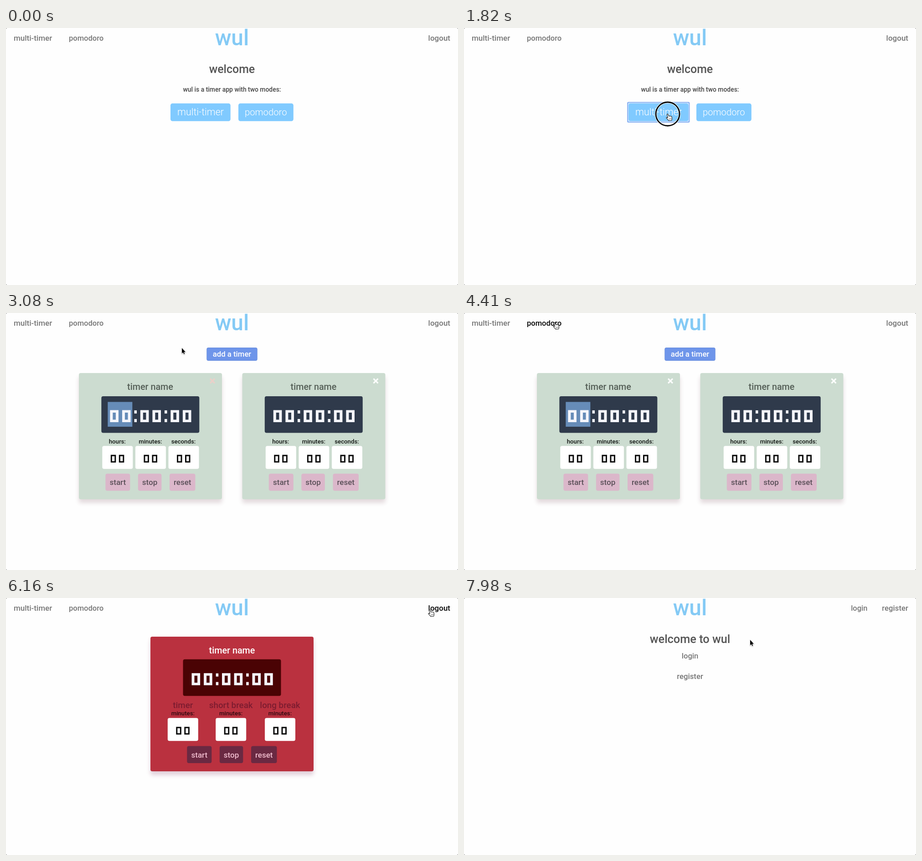
An HTML page with a canvas that plays this animation: 992x565 px, repeating every 8 s.

```html
<!DOCTYPE html>
<html lang="en">
<head>
<meta charset="utf-8">
<title>timer app</title>
<style>
html, body { margin: 0; width: 100%; height: 100%; overflow: hidden; background: #fefefe; }
canvas { display: block; width: 992px; height: 565px; }
</style>
</head>
<body>
<canvas id="stage" width="992" height="565"></canvas>
<script>
const W = 992, H = 565, LOOP = 8000, STEP = 70;
const APP = 'wul';
const ctx = document.getElementById('stage').getContext('2d');

// Pointer track: time, x, y
const TRACK = [
  [0, 566, 590], [420, 500, 330], [840, 446, 188], [980, 447, 189],
  [2380, 447, 189], [2870, 453, 152], [3080, 386, 77], [3640, 240, 36],
  [4060, 199, 21], [4900, 199, 21], [5250, 470, 52], [5390, 470, 52],
  [6090, 930, 26], [7420, 930, 26], [7770, 628, 92], [8000, 628, 92]
];
const CLICKS = [[1820, 1890], [1960, 2100], [4270, 4410], [6300, 6440]];
const PAGES = [[6510, 'guest'], [4480, 'pomodoro'], [1890, 'multi'], [0, 'home']];

function clamp(v) { return v < 0 ? 0 : v > 1 ? 1 : v; }

function pointerAt(t) {
  let i = 0;
  while (i < TRACK.length - 2 && t >= TRACK[i + 1][0]) i++;
  const [t0, x0, y0] = TRACK[i], [t1, x1, y1] = TRACK[i + 1];
  const k = clamp((t - t0) / (t1 - t0)), e = k * k * (3 - 2 * k);
  return { x: x0 + (x1 - x0) * e, y: y0 + (y1 - y0) * e };
}

function within(p, x0, y0, x1, y1) {
  return p.x >= x0 && p.x < x1 && p.y >= y0 && p.y < y1;
}

function text(str, x, y, size, color, weight = 500, align = 'center') {
  ctx.font = `${weight} ${size}px Roboto, "Open Sans", sans-serif`;
  ctx.textAlign = align;
  ctx.fillStyle = color;
  ctx.fillText(str, x, y);
}

function box(x, y, w, h, color, r = 4) {
  ctx.fillStyle = color;
  ctx.beginPath();
  ctx.roundRect(x, y, w, h, r);
  ctx.fill();
}

function card(x, y, w, h, color, shadow) {
  ctx.save();
  ctx.shadowColor = shadow;
  ctx.shadowBlur = 10;
  ctx.shadowOffsetY = 8;
  box(x, y, w, h, color);
  ctx.restore();
}

function zero(x, y, w, h, side, cap) {
  ctx.beginPath();
  ctx.rect(x, y, w, h);
  ctx.rect(x + side, y + cap, w - 2 * side, h - 2 * cap);
  ctx.fill('evenodd');
}

function clock(x, y, back, selected) {
  box(x, y, 215, 80.5, back);
  if (selected) box(x + 14, y + 12.5, 54, 54.5, '#668cb8', 0);
  ctx.fillStyle = '#f5f6fc';
  let gx = x + 19;
  for (const ch of '00:00:00') {
    if (ch === '0') {
      zero(gx, y + 30.5, 18.6, 26.5, 6, 5.5);
      gx += 26.6;
    } else {
      ctx.fillRect(gx, y + 31, 5.5, 7);
      ctx.fillRect(gx, y + 50, 5.5, 7);
      gx += 13.3;
    }
  }
}

function field(x, y) {
  box(x, y, 67, 50.5, '#fff');
  ctx.fillStyle = '#0a0a0a';
  zero(x + 18.5, y + 19.5, 11.5, 17, 3, 3);
  zero(x + 36.5, y + 19.5, 11.5, 17, 3, 3);
}

function controls(x, y, back, ink) {
  const items = [['start', 0, 54], ['stop', 71.5, 51.5], ['reset', 140.7, 56.5]];
  for (const [label, dx, w] of items) {
    box(x + dx, y, w, 37.5, back);
    text(label, x + dx + w / 2, y + 25, 17, ink);
  }
}

function cross(x, y, color) {
  ctx.strokeStyle = color;
  ctx.lineWidth = 3.2;
  ctx.lineCap = 'butt';
  ctx.beginPath();
  ctx.moveTo(x - 5, y - 5);
  ctx.lineTo(x + 5, y + 5);
  ctx.moveTo(x + 5, y - 5);
  ctx.lineTo(x - 5, y + 5);
  ctx.stroke();
}

function timerCard(x, selected, crossColor) {
  card(x, 132, 314, 277.5, '#ccdcd0', 'rgba(90,30,50,.16)');
  cross(x + 293, 149.3, crossColor);
  text('timer name', x + 156.5, 168.5, 19.75, '#566058');
  clock(x + 49.3, 183, '#2f3a4b', selected);
  ['hours:', 'minutes:', 'seconds:'].forEach((label, i) => {
    const fx = x + 51.3 + 72.6 * i;
    text(label, fx + 33, 286.5, 13.2, '#101411');
    field(fx, 292.3);
  });
  controls(x + 58.3, 353.3, '#dbb7ca', '#5b5059');
}

const NAV = {
  user: [
    ['multi-timer', 17, 'left', 17, 0, 119],
    ['pomodoro', 138, 'left', 16.5, 120, 232],
    ['logout', 975, 'right', 17, 909, 992]
  ],
  guest: [
    ['login', 885.5, 'right', 16.5, 834, 902],
    ['register', 975, 'right', 16.8, 902, 992]
  ]
};

// Draws the top bar; returns true when the pointer is over a link
function navBar(items, p) {
  let over = false;
  for (const [label, x, align, size, x0, x1] of items) {
    const hot = within(p, x0, 5, x1, 40);
    over = over || hot;
    text(label, x, 28, size, hot ? '#080808' : '#777', 500, align);
  }
  text(APP, 496, 38, 48, '#84caf5');
  return over;
}

const pages = {
  home(t, p) {
    text('welcome', 496, 99, 24.9, '#555');
    text(APP + ' is a timer app with two modes:', 496, 140, 13.9, '#444');
    if (t >= 1820) {
      box(358, 162.5, 137.5, 45.5, '#8db4f2', 3);
      box(360, 164.5, 133.5, 41.5, '#d3e5fd', 3);
    }
    box(361, 165.7, 131.7, 39, '#80caff', 4.5);
    box(510, 165.7, 120.8, 39, '#80caff', 4.5);
    text('multi-timer', 427, 192, 21.3, '#fff', 300);
    text('pomodoro', 570.3, 192, 20.3, '#fff', 300);
    return within(p, 361, 166, 492, 204) || within(p, 510, 166, 630, 204);
  },
  multi(t, p) {
    box(440.3, 76, 111.4, 29, '#6388d6');
    box(441, 76.7, 110, 27.6, '#6e95ea', 3.5);
    text('add a timer', 496, 96.3, 16.7, '#fff');
    const pink = clamp((t - 2700) / 150) * clamp((3220 - t) / 220);
    const mix = (a, b) => Math.round(a + (b - a) * pink);
    const hot = `rgb(${mix(252, 226)},${mix(253, 182)},${mix(252, 172)})`;
    timerCard(160, t >= 1960, hot);
    timerCard(518.5, false, '#fcfdfc');
    return within(p, 443, 139, 463, 159);
  },
  pomodoro() {
    card(317, 85, 358, 296, '#ba313f', 'rgba(110,20,70,.2)');
    text('timer name', 496, 121.5, 19.75, '#fff');
    clock(388.5, 134.7, '#4a0304', false);
    const parts = [['timer', 388.3], ['short break', 493.7], ['long break', 601.5]];
    for (const [label, x] of parts) {
      text(label, x, 241.5, 18.8, '#7d1c30');
      text('minutes:', x, 258, 13.2, '#2c0a10');
      field(x - 33.5, 263.7);
    }
    controls(397.3, 325.5, '#6a2942', '#f0bccd');
    return false;
  },
  guest() {
    text('welcome to ' + APP, 496, 99, 25.3, '#555');
    text('login', 496, 133, 16.6, '#777');
    text('register', 496, 178, 16.8, '#777');
    return false;
  }
};

const ARROW = new Path2D('M0 0V12L2.7 9.5L4.5 13.5L6.2 12.8L4.5 8.8H8Z');
const HAND = new Path2D('M-1.6 1.2Q-1.2 -.6 .6 .2L2.6 5Q3.6 3.9 4.6 4.9Q5.8 4 6.7 5' +
  'Q8.2 4.4 8.9 6L9.5 9.5Q9.6 11.6 8.6 14.2L2.2 14.8Q.6 12.2 -2.6 9.4' +
  'Q-3.6 7.8 -1.8 7.4L.4 8.6Z');
const FINGERS = new Path2D('M3 9.6L3.5 12.6M5 9.3L5.4 12.4M7 9L7.3 12');

function pointer(p, hand) {
  ctx.save();
  ctx.translate(p.x, p.y);
  ctx.lineJoin = 'round';
  if (hand) {
    ctx.fillStyle = '#fff';
    ctx.fill(HAND);
    ctx.strokeStyle = '#1a1a1a';
    ctx.lineWidth = 1.1;
    ctx.stroke(HAND);
    ctx.lineWidth = 0.6;
    ctx.stroke(FINGERS);
  } else {
    ctx.shadowColor = 'rgba(0,0,0,.3)';
    ctx.shadowBlur = 2;
    ctx.shadowOffsetY = 1;
    ctx.strokeStyle = '#fff';
    ctx.lineWidth = 1.6;
    ctx.stroke(ARROW);
    ctx.shadowColor = 'transparent';
    ctx.fillStyle = '#050505';
    ctx.fill(ARROW);
  }
  ctx.restore();
}

function clickRing(p) {
  ctx.beginPath();
  ctx.arc(p.x, p.y, 26, 0, Math.PI * 2);
  ctx.strokeStyle = 'rgba(255,255,255,.8)';
  ctx.lineWidth = 5;
  ctx.stroke();
  ctx.strokeStyle = '#060606';
  ctx.lineWidth = 2.8;
  ctx.stroke();
}

function draw(t) {
  ctx.fillStyle = '#777';
  ctx.fillRect(0, 0, W, H);
  box(0, 0, W, H, '#fefefe', 3);
  const p = pointerAt(t);
  const page = PAGES.find(([start]) => t >= start)[1];
  const overPage = pages[page](t, p);
  const overNav = navBar(page === 'guest' ? NAV.guest : NAV.user, p);
  if (t >= STEP) pointer(p, overPage || overNav);
  if (CLICKS.some(([a, b]) => t >= a && t < b)) clickRing(p);
}

const begin = performance.now();
function tick() {
  const t = (performance.now() - begin) % LOOP;
  draw(Math.floor(t / STEP) * STEP);
  requestAnimationFrame(tick);
}
tick();
</script>
</body>
</html>
```
